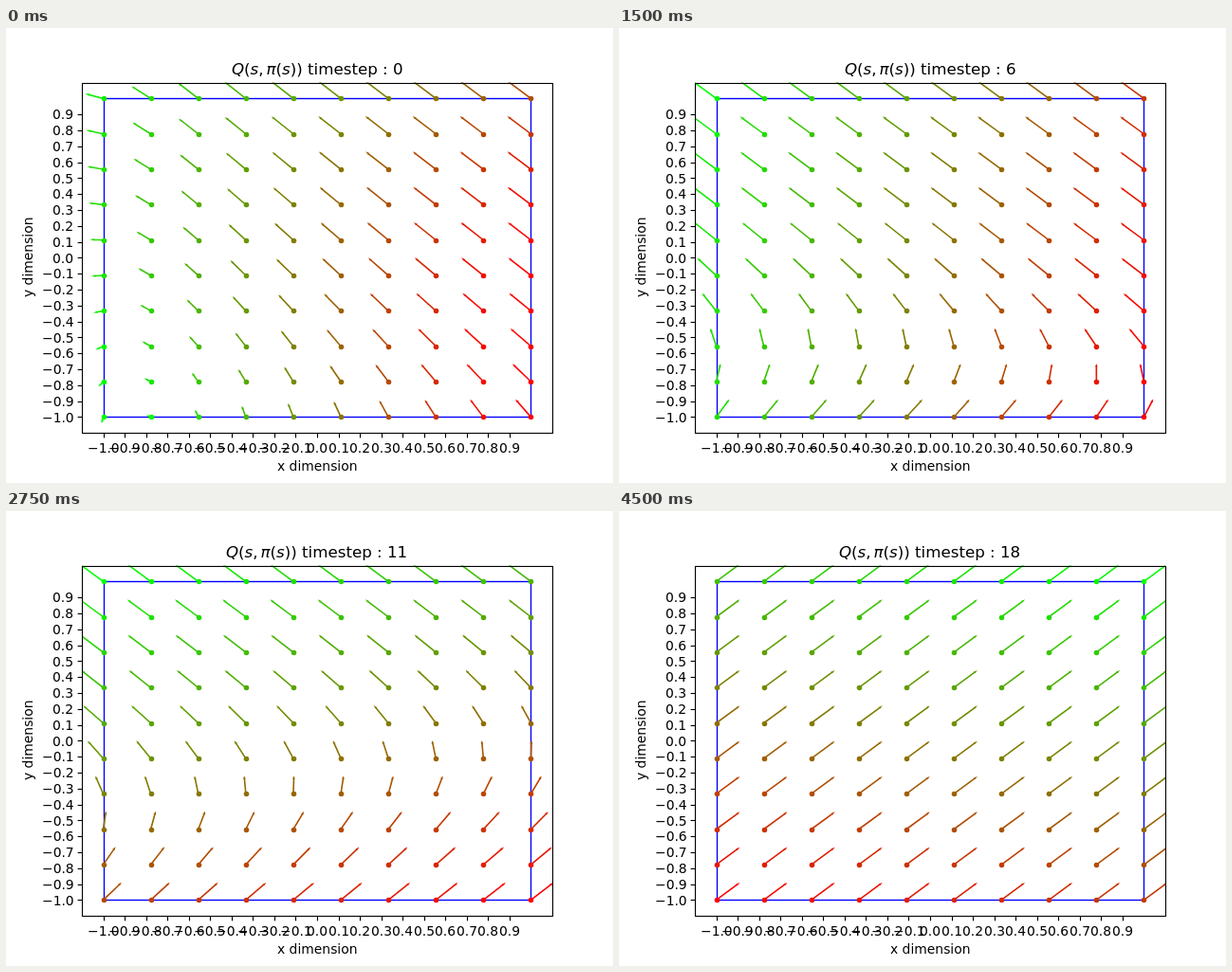
An HTML page with a canvas that plays this animation: 640 px wide and 480 px high, repeating every 4750 ms.

```html
<!DOCTYPE html>
<html lang="en">
<head>
<meta charset="utf-8">
<title>Policy field</title>
<style>
html, body { margin: 0; width: 100%; height: 100%; overflow: hidden; background: #fff; }
canvas { display: block; }
</style>
</head>
<body>
<canvas id="stage" width="640" height="480"></canvas>
<script>
const ctx = document.getElementById('stage').getContext('2d');
const STEP_MS = 250, STEPS = 19, GRID = 10;
const FONT = '"DejaVu Sans", sans-serif';
const LABEL = `13.89px ${FONT}`, TITLE = `16.67px ${FONT}`;
const AXES = { left: 80, top: 57.6, width: 496, height: 369.6 };
const px = x => AXES.left + (x + 1.1) / 2.2 * AXES.width;
const py = y => AXES.top + (1.1 - y) / 2.2 * AXES.height;
const snap = v => Math.round(v) + 0.5;
const clamp = v => Math.min(1, Math.max(0, v));

// Policy weights at a few steps, for the terms 1, x, y, xy, x².
const leftward = {
  0: [1.05, .75, .8, .4, .15],
  2: [2.5, 1.5, 1.9, .3, 0],
  6: [1.4, .4, 2.2, .3, .3],
  7: [.9, -.35, 2.1, 0, 0],
  10: [2.1, -.25, 1.05, .3, 0],
  11: [.6, -.4, 2, 0, 0],
  13: [1.02, -.15, 2.1, 0, 0],
  15: [-2.1, 0, 1.2, 0, -.3],
  18: [-2.6, 0, 0, 0, 0]
};
const upward = { 0: [1.9, 1.9, .85, .6, 0], 2: [2.3, 0, 0, 0, 0], 18: [2.3, 0, 0, 0, 0] };
// Direction in degrees in which the value rises from green to red.
const slope = { 0: [-6], 2: [-17], 6: [-12], 10: [-60], 13: [-85], 18: [-107] };

function weightsAt(track, step) {
  const keys = Object.keys(track).map(Number);
  const b = keys.find(k => k >= step);
  const a = keys.filter(k => k <= step).pop();
  const t = a === b ? 0 : (step - a) / (b - a);
  return track[a].map((v, i) => v + (track[b][i] - v) * t);
}

const action = ([w, wx, wy, wxy, wxx], x, y) =>
  .1 * Math.tanh(w + wx * x + wy * y + wxy * x * y + wxx * x * x);

// A tilted plane scaled to 0..1, bent a little in the early steps.
function heat(step, angle, x, y) {
  const c = Math.cos(angle), s = Math.sin(angle);
  const bend = .14 * Math.max(0, 1 - step / 8);
  const plane = (c * x + s * y) / (Math.abs(c) + Math.abs(s));
  return clamp(.5 + plane / 2 + bend * (.5 - y * (x + y)));
}

// Align is 0 for left, 0.5 for centre, 1 for right; text starts on a whole pixel.
function text(str, x, y, align, font = LABEL) {
  ctx.font = font;
  ctx.fillText(str, Math.round(x - ctx.measureText(str).width * align), y);
}

function line(x1, y1, x2, y2) {
  ctx.beginPath();
  ctx.moveTo(x1, y1);
  ctx.lineTo(x2, y2);
  ctx.stroke();
}

function drawArrow(x, y, dx, dy) {
  const length = Math.hypot(dx, dy) || 1e-6;
  const ux = dx / length, uy = dy / length;
  const outline = [[0, .0005], [length, .0005], [length, .0015], [length + .0045, 0],
                   [length, -.0015], [length, -.0005], [0, -.0005]];
  ctx.beginPath();
  for (const [along, side] of outline)
    ctx.lineTo(px(x + ux * along - uy * side), py(y + uy * along + ux * side));
  ctx.closePath();
  ctx.fill();
  ctx.stroke();
}

function drawField(step) {
  const left = weightsAt(leftward, step), up = weightsAt(upward, step);
  const angle = weightsAt(slope, step)[0] * Math.PI / 180;
  ctx.save();
  ctx.beginPath();
  ctx.rect(AXES.left, AXES.top, AXES.width, AXES.height);
  ctx.clip();
  ctx.lineWidth = 1.39;
  ctx.strokeStyle = '#00f';
  ctx.strokeRect(snap(px(-1)), snap(py(1)), snap(px(1)) - snap(px(-1)), snap(py(-1)) - snap(py(1)));
  for (let i = 0; i < GRID; i++) for (let j = 0; j < GRID; j++) {
    const x = i / (GRID - 1) * 2 - 1, y = j / (GRID - 1) * 2 - 1;
    const red = Math.round(255 * heat(step, angle, x, y));
    ctx.fillStyle = ctx.strokeStyle = `rgb(${red},${255 - red},0)`;
    drawArrow(x, y, -action(left, x, y), action(up, x, y));
    ctx.beginPath();
    ctx.arc(snap(px(x)), snap(py(y)), 2.78, 0, 2 * Math.PI);
    ctx.fill();
  }
  ctx.restore();
}

function drawAxes() {
  ctx.fillStyle = ctx.strokeStyle = '#000';
  ctx.lineWidth = 1.11;
  ctx.strokeRect(80.5, 58.5, 496, 369);
  for (let i = -10; i < 10; i++) {
    const v = i / 10, label = v.toFixed(1).replace('-', '\u2212');
    const x = snap(px(v)), y = snap(py(v));
    line(x, 427.5, x, 432.4);
    line(75.6, y, 80.5, y);
    text(label, px(v), 448, .5);
    text(label, 71.2, Math.round(py(v) + 5.2), 1);
  }
  text('x dimension', 328.4, 467, .5);
  ctx.save();
  ctx.translate(28, 242);
  ctx.rotate(-Math.PI / 2);
  text('y dimension', 0, 0, .5);
  ctx.restore();
}

function drawTitle(step) {
  const italic = `italic ${TITLE}`, gap = 3;
  const runs = [['Q', italic], ['(', TITLE], ['s', italic], [',', TITLE, gap], ['π', italic],
                ['(', TITLE], ['s', italic], [`)) timestep : ${step}`, TITLE]];
  const widths = runs.map(([str, font, space = 0]) => {
    ctx.font = font;
    return ctx.measureText(str).width + space;
  });
  let x = Math.round(328 - widths.reduce((a, b) => a + b) / 2);
  runs.forEach(([str, font], i) => {
    ctx.font = font;
    ctx.fillText(str, x, 49);
    x += widths[i];
  });
}

let shown = -1;
function tick() {
  const step = Math.floor(performance.now() / STEP_MS) % STEPS;
  if (step !== shown) {
    shown = step;
    ctx.fillStyle = '#fff';
    ctx.fillRect(0, 0, 640, 480);
    drawField(step);
    drawAxes();
    drawTitle(step);
  }
  requestAnimationFrame(tick);
}
tick();
</script>
</body>
</html>
```
